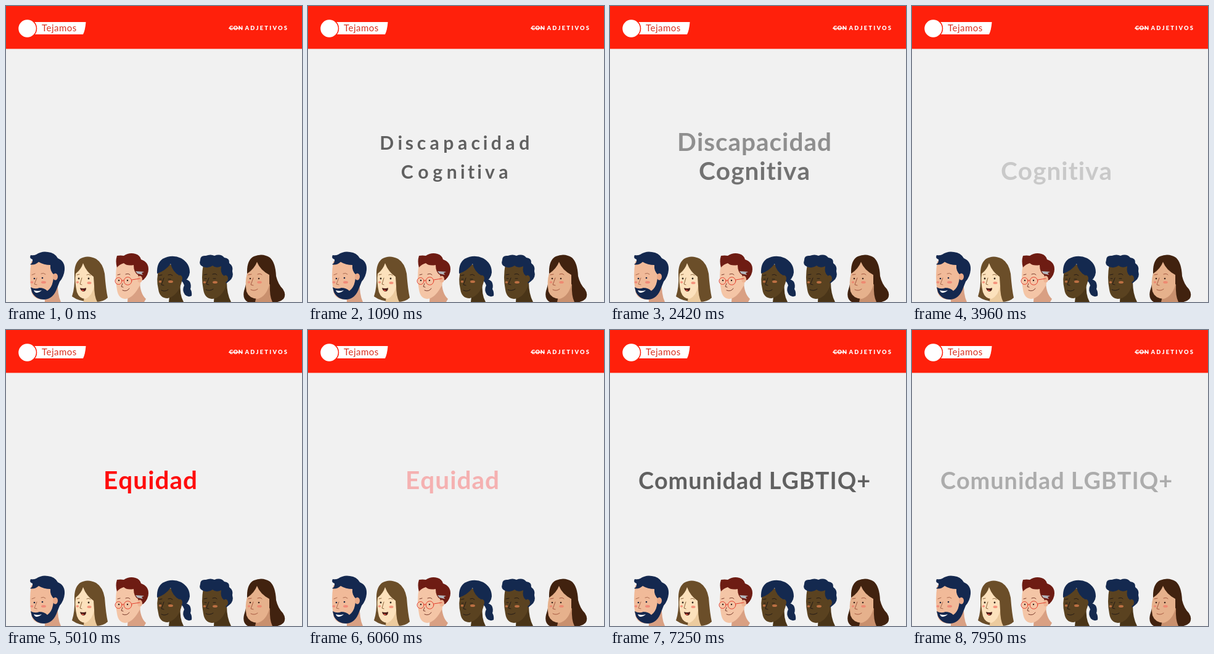
Animation, 480 px wide and 480 px high, one loop 8000 ms. Source, as an HTML page with a canvas:

```html
<!DOCTYPE html>
<html lang="es">
<head>
<meta charset="utf-8">
<title>Equidad</title>
<style>
  html, body { margin: 0; width: 100%; height: 100%; overflow: hidden; background: #f1f1f1; }
  svg, canvas { position: absolute; left: 0; top: 0; width: 480px; height: 480px; }
  text { font-family: Lato, sans-serif; }
  .line { fill: none; stroke-width: 1; stroke-linecap: round; }
</style>
</head>
<body>
<svg viewBox="0 0 480 480">
  <rect width="480" height="480" fill="#f1f1f1"/>
  <rect width="480" height="69.5" fill="#ff200b"/>
  <path d="M38 26H129.5Q128.500 39 125 46H38Z" fill="#fff"/>
  <circle cx="34.500" cy="36.500" r="15" fill="#fff" stroke="#ff200b" stroke-width="1.5"/>
  <text x="58" y="41" font-size="15" fill="#d9301f" letter-spacing=".5">Tejamos</text>
  <g fill="#fff" font-size="9.300" font-weight="900">
    <text x="362" y="39.300" letter-spacing=".6">CON</text>
    <text x="387.500" y="39.300" letter-spacing="2.250">ADJETIVOS</text>
    <rect x="361" y="35.500" width="23" height="1.300"/>
  </g>

  <!-- bearded man -->
  <g>
    <path d="M62 460L84 445Q83 468 89 480H63Z" fill="#d9a083"/>
    <path d="M41 414Q57 408 78 418L82 455Q72 476 57 476Q43 474 41 462Q37 438 41 414Z" fill="#f1ba99"/>
    <path d="M39 419Q44 416 43 411Q37 409 40 404Q45 405 49 403Q58 397 68 399Q79 400 84 409Q96 414 95 428Q94 439 87 447L83 457Q77 475 62 476Q48 476 42 464L40 456Q47 460 54 457Q62 457 67 462Q74 457 76 447L78 436Q71 430 72 420Q61 420 53 415Q46 421 39 419Z" fill="#14284f"/>
    <ellipse cx="80" cy="439" rx="4" ry="5.500" fill="#eaa988"/>
    <path d="M45 461Q52 463 58 461Q54 465 49 465Q46 464 45 461Z" fill="#fff"/>
    <path class="line" d="M42 436l5-2M57 434q4-2 7 1M50 441l-4 10 4 1" stroke="#a9694e"/>
    <g fill="#17233f"><circle cx="46" cy="442" r="1.300"/><circle cx="59" cy="441" r="1.300"/></g>
    <ellipse cx="61" cy="448" rx="4" ry="2" fill="#f08a78"/>
    <ellipse cx="42" cy="448" rx="2.500" ry="1.800" fill="#f08a78"/>
  </g>

  <!-- woman with a bob -->
  <g>
    <path d="M111 437Q110 418 120 410Q132 403 146 410Q157 417 160 434Q162 460 165 473Q158 480 145 480H137Q118 479 107 471Q112 456 111 437Z" fill="#6b4e29"/>
    <path d="M127 465L143 453Q143 471 148 480H126Z" fill="#eccb9f"/>
    <path d="M113 434Q122 427 125 417Q130 431 142 439L143 454Q140 470 129 475Q119 475 115 464Q111 447 113 434Z" fill="#fce1bc"/>
    <path class="line" d="M115 436l4-1M131 436q4-2 6 1M123 441l-3 10 3 1" stroke="#8d653c"/>
    <g fill="#35271b"><circle cx="118" cy="442" r="1.400"/><circle cx="134" cy="442" r="1.400"/></g>
    <path d="M120 457Q125 459 130 457Q130 463 125 463Q121 462 120 457Z" fill="#4a1c16"/>
    <path d="M122 461q3-2 5 1-3 1-5-1Z" fill="#e65343"/>
    <g fill="#f5947d"><ellipse cx="135" cy="449" rx="3.500" ry="2"/><ellipse cx="116" cy="448" rx="2.200" ry="1.800"/></g>
  </g>

  <!-- man with glasses -->
  <g>
    <path d="M198 466L217 446Q217 466 227 475L224 480H197Z" fill="#d9a083"/>
    <path d="M180 418Q197 410 213 422L218 451Q207 474 193 475Q182 474 180 460Q176 441 180 418Z" fill="#f4c5a6"/>
    <path d="M180 424Q177 414 180 405Q186 404 191 405Q200 399 210 402Q217 404 219 411Q231 415 231 427Q231 436 223 444L217 446L214 436Q207 432 207 420Q196 422 191 417Q184 419 180 424Z" fill="#6e1c13"/>
    <path d="M210 430l14 1-4 2 2 3-9-2Z" fill="#b4b7bd"/>
    <ellipse cx="217" cy="443" rx="4" ry="5.500" fill="#efb493"/>
    <g class="line" stroke="#e4402e"><circle cx="182.500" cy="446" r="5.500"/><circle cx="197.500" cy="446" r="6.300"/><path d="M188 445h3M204 444l13-2"/></g>
    <path class="line" d="M181 436l4-1M194 435q5-2 7 1M189 450l-2 5 3 1M189 461q7 3 11-3" stroke="#793b2c"/>
    <g fill="#30211d"><circle cx="183" cy="445" r="1.200"/><circle cx="197" cy="445" r="1.200"/></g>
  </g>

  <!-- woman with a ponytail -->
  <g>
    <path d="M285 444Q292 441 298 447Q301 453 299 459Q302 464 301 470Q295 473 290 468Q285 461 289 453Z" fill="#14294f"/>
    <path d="M266 462L283 447Q281 468 288 480H264Z" fill="#4a3518"/>
    <path d="M248 426Q261 413 279 424L285 447Q279 470 262 474Q249 474 247 459Q243 443 248 426Z" fill="#5a4220"/>
    <path d="M245 434Q244 417 254 410Q269 402 284 409Q298 417 298 432Q297 443 286 448L281 437Q270 431 267 418Q259 429 245 434Z" fill="#14294f"/>
    <ellipse cx="282" cy="442" rx="4" ry="5.500" fill="#5a4220"/>
    <path class="line" d="M248 437l5-1M263 436q4-2 7 1M256 441l-4 11 4 1M252 461q6 3 11-1M249 443h3M263 443h4" stroke="#241b17"/>
    <g fill="#bd7043"><ellipse cx="267" cy="447" rx="4" ry="2"/><ellipse cx="250" cy="447" rx="2.300" ry="1.800"/></g>
  </g>

  <!-- curly-haired man -->
  <g>
    <path d="M338 464L358 447Q358 467 365 480H337Z" fill="#4a3518"/>
    <path d="M320 419Q337 412 354 424L358 451Q350 474 334 475Q322 474 320 460Q316 440 320 419Z" fill="#5a4220"/>
    <path d="M320 423Q312 420 315 412Q315 404 324 405Q332 402 338 405Q348 401 354 408Q363 409 362 417Q369 422 367 430Q370 440 362 446L357 450L353 437Q347 433 349 422Q341 426 335 421Q328 426 320 423Z" fill="#14294f"/>
    <ellipse cx="356" cy="442" rx="4" ry="5.500" fill="#5a4220"/>
    <path class="line" d="M321 436l5-1M335 435q5-2 7 1M329 441l-4 10 4 1M322 442h3M336 442h4M324 460q6 3 12-1" stroke="#241b17"/>
    <g fill="#bd7043"><ellipse cx="339" cy="448" rx="4" ry="2"/><ellipse cx="322" cy="448" rx="2.300" ry="1.800"/></g>
  </g>

  <!-- woman with long hair -->
  <g>
    <path d="M391 434Q390 412 402 406Q416 400 428 408Q437 416 438 438Q441 451 449 459Q455 468 450 475Q443 482 430 480H392Q383 475 386 462Q391 447 391 434Z" fill="#41220f"/>
    <path d="M407 466L428 451Q427 470 432 480H404Z" fill="#c9906e"/>
    <path d="M391 434Q403 426 407 415Q412 428 427 436L427 452Q422 471 408 475Q394 474 390 463Q387 447 391 434Z" fill="#e6b18c"/>
    <path class="line" d="M393 436l5-1M408 435q5-2 7 1M401 441l-4 11 4 1M397 460q6 3 11-1" stroke="#a5573f"/>
    <g fill="#3c241a"><circle cx="396" cy="442" r="1.300"/><circle cx="410" cy="442" r="1.300"/></g>
    <g fill="#ee8a72"><ellipse cx="411" cy="448" rx="3.800" ry="2"/><ellipse cx="394" cy="448" rx="2.200" ry="1.800"/></g>
  </g>
</svg>
<canvas id="stage" width="480" height="480"></canvas>

<script>
const LOOP = 8000, FIRST = 740, STEP = 70, GROW = 470;
const CENTER = 234, PIVOT = { x: 13, y: -9 };
const GRAY = '#606060', RED = '#ff0d0d';

// fade: [time, opacity] steps
const lines = [
  { text: 'Discapacidad', y: 235, size: 40.5, color: GRAY, start: 740,
    fade: [[1600, 1], [2420, .68], [3750, 0]] },
  { text: 'Cognitiva', y: 282, size: 40.5, color: GRAY, start: 740,
    fade: [[2100, 1], [2420, .88], [3960, .28], [4330, 0]] },
  { text: 'Equidad', y: 258, size: 40.5, color: RED, start: 4340,
    fade: [[5450, 1], [6300, 0]] },
  { text: 'Comunidad LGBTIQ+', y: 258, size: 37.8, color: GRAY, start: 6370,
    fade: [[7250, 1], [7950, .48]] }
];

const ctx = document.getElementById('stage').getContext('2d');
const clamp = v => Math.max(0, Math.min(1, v));

function valueAt(steps, t) {
  if (t <= steps[0][0]) return steps[0][1];
  for (let i = 1; i < steps.length; i++) {
    const [t0, v0] = steps[i - 1], [t1, v1] = steps[i];
    if (t <= t1) return v0 + (v1 - v0) * (t - t0) / (t1 - t0);
  }
  return steps[steps.length - 1][1];
}

// Each letter grows in place about a pivot to the right of its middle.
function drawLine({ text, y, size, color, start, fade }, t) {
  const age = t - start, scale = clamp(age / GROW);
  const alpha = clamp(age / 300) * valueAt(fade, t);
  if (scale <= 0 || alpha <= 0) return;

  ctx.font = `700 ${size}px Lato, sans-serif`;
  ctx.textAlign = 'center';
  ctx.fillStyle = color;
  ctx.globalAlpha = alpha;

  const widths = [...text].map(c => ctx.measureText(c).width + 1);
  let x = CENTER - widths.reduce((a, b) => a + b) / 2;
  [...text].forEach((c, i) => {
    ctx.save();
    ctx.translate(x + widths[i] / 2 + PIVOT.x, y + PIVOT.y);
    ctx.scale(scale, scale);
    ctx.fillText(c, -PIVOT.x, -PIVOT.y);
    ctx.restore();
    x += widths[i];
  });
}

const origin = performance.now();
function render(now) {
  const t = Math.max(0, now - origin) % LOOP;
  const held = t < FIRST ? 0 : FIRST + Math.floor((t - FIRST) / STEP) * STEP;
  ctx.clearRect(0, 0, 480, 480);
  lines.forEach(line => drawLine(line, held));
  requestAnimationFrame(render);
}
render(origin);
</script>
</body>
</html>
```
